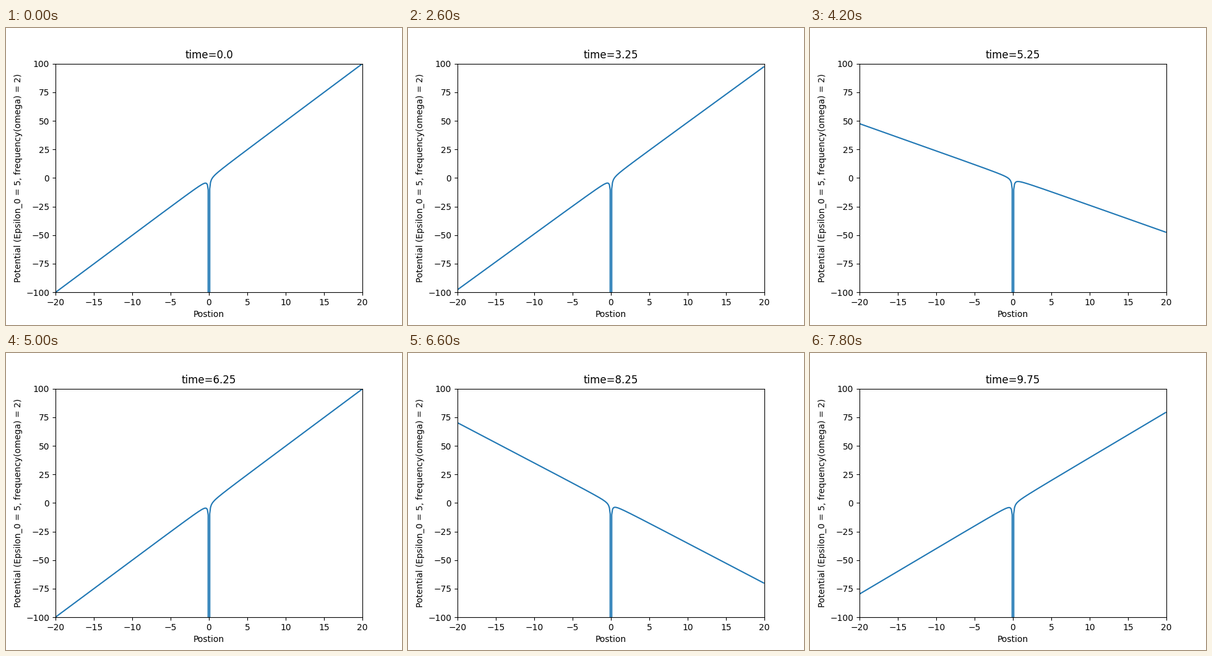
A matplotlib script that plays this animation: 640 px wide and 480 px high, repeating every 8 s.

```python
import numpy as np
import matplotlib.pyplot as plt
from matplotlib.animation import FuncAnimation

EPSILON = 5
OMEGA = 2
STEP = 0.25
FRAMES = 40

# The sample nearest the origin is a tiny non-zero value, so the well drops
# steeply out of view instead of leaving a gap.
x = np.arange(-20, 20, 0.1)


def potential(t):
    return -1 / np.abs(x) + EPSILON * x * np.cos(OMEGA * t)


fig, ax = plt.subplots(figsize=(6.4, 4.8), dpi=100)
ax.set_xlim(-20, 20)
ax.set_ylim(-100, 100)
ax.set_xlabel("Postion")
ax.set_ylabel(f"Potential (Epsilon_0 = {EPSILON}, frequency(omega) = {OMEGA})")
line, = ax.plot(x, potential(0))
title = ax.set_title("time=0.0")


def update(i):
    t = i * STEP
    line.set_ydata(potential(t))
    title.set_text(f"time={t}")
    return line, title


anim = FuncAnimation(fig, update, frames=FRAMES, interval=200,
                     repeat=True, repeat_delay=0, blit=False)
plt.show()
```
